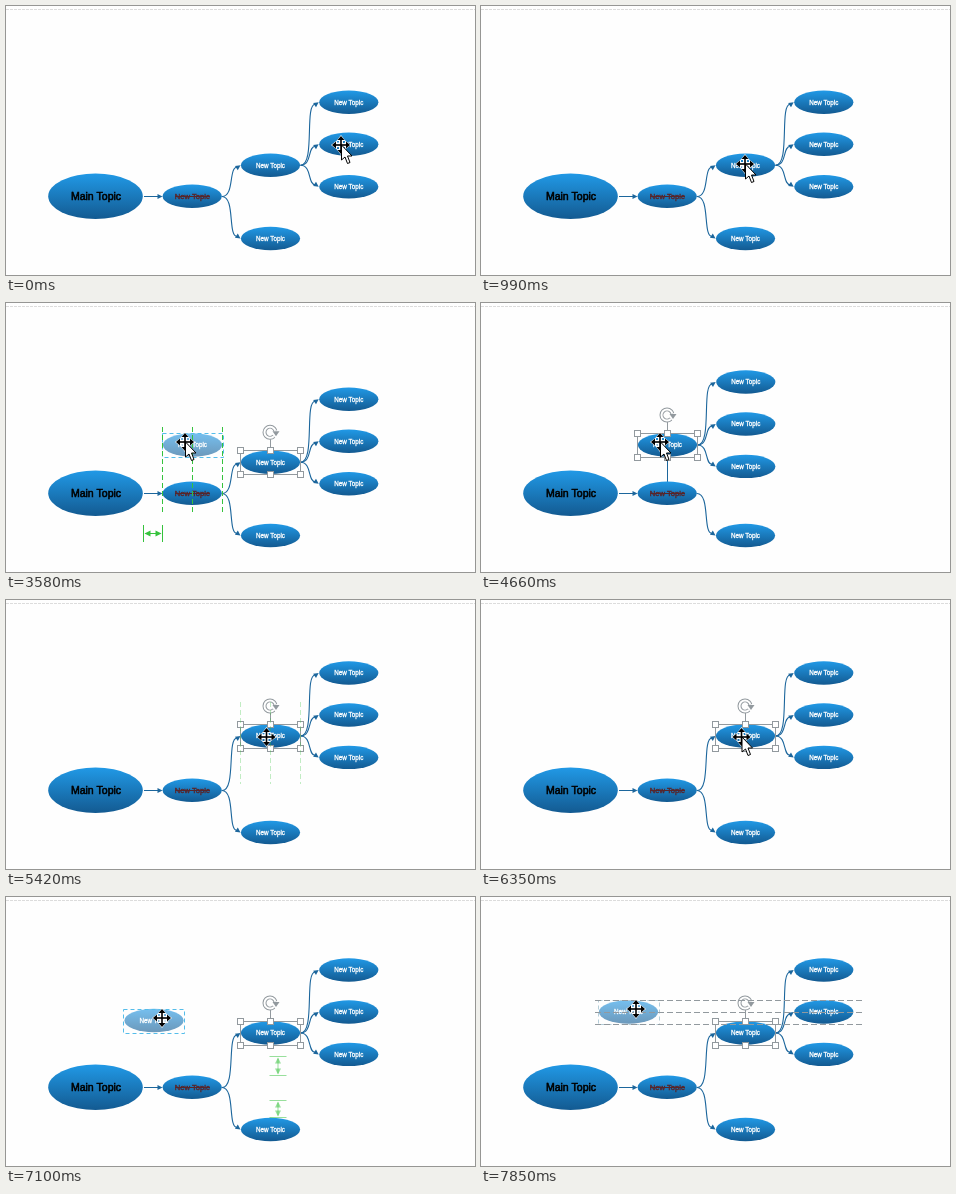
An HTML page with a canvas that plays this animation: 469x269 px, repeating every 8000 ms.

```html
<!DOCTYPE html>
<html lang="en">
<head>
<meta charset="utf-8">
<title>Mind map drag</title>
<style>
  html, body { margin: 0; width: 469px; height: 269px; overflow: hidden; background: #fefefe; }
  canvas { display: block; }
</style>
</head>
<body>
<canvas id="stage" width="469" height="269"></canvas>
<script>
const ctx = document.getElementById('stage').getContext('2d');
const LOOP = 8000;
const BLUE = '#1c669c', GREEN = '#35c23c', GRAY = '#92999e', BROWN = '#57252a';
const MAIN = { x: 89.5, y: 190.3, rx: 47.3, ry: 22.8 };
const SUB = { x: 186.2, y: 190.3 }, LOWER = { x: 264.5, y: 232.5 }, HOME = { x: 264.5, y: 159.3 };

// Cursor travel: each glide eases in the given number of steps from where the last one ended.
const START = { x: 335, y: 139 };
const glides = [
  { start: -25, end: 990, steps: 7, to: { x: 264, y: 158 }, via: { x: 383, y: 56 } },
  { start: 1300, end: 1600, steps: 2, to: { x: 254, y: 161 } },
  { start: 1910, end: 2660, steps: 5, to: { x: 179, y: 139 } },
  { start: 4660, end: 5110, steps: 3, to: { x: 260.5, y: 137 } },
  { start: 6350, end: 7100, steps: 5, to: { x: 156, y: 121 } },
  { start: 7100, end: 7550, steps: 3, to: { x: 155, y: 112 } }
];
const SELECTED = 1600;
const drags = [
  { from: 2060, snap: 2660, drop: 3730, release: 3430, dx: 10, dy: -2,
    spot: { x: 186.5, y: 142 }, columns: [124, 212] },
  { from: 4810, snap: 5110, drop: 5420, release: 5570, dx: 6, dy: 4,
    spot: { x: 264.5, y: 136 }, columns: [102, 184] },
  { from: 6500, snap: 7400, drop: LOOP, release: LOOP, dx: -8, dy: 2.5,
    spot: { x: 147.5, y: 115 }, rows: [114, 382] }
];
const within = (t, a, b) => t >= a && t < b;
const smooth = p => p * p * (3 - 2 * p);

function cursorAt(t) {
  return glides.reduce((from, { start, end, steps, to, via }) => {
    const step = Math.floor((t - start) / (end - start) * steps + 1e-6);
    const p = smooth(Math.min(1, Math.max(0, step / steps)));
    const curve = k => {
      const mid = via ? via[k] : (from[k] + to[k]) / 2;
      return (1 - p) ** 2 * from[k] + 2 * p * (1 - p) * mid + p * p * to[k];
    };
    return { x: curve('x'), y: curve('y') };
  }, START);
}

function line(x1, y1, x2, y2, color, dash = []) {
  ctx.strokeStyle = color;
  ctx.lineWidth = 1;
  ctx.setLineDash(dash);
  ctx.beginPath();
  ctx.moveTo(x1, y1);
  ctx.lineTo(x2, y2);
  ctx.stroke();
  ctx.setLineDash([]);
}

function poly(points, fill) {
  ctx.beginPath();
  points.forEach(([x, y]) => ctx.lineTo(x, y));
  ctx.closePath();
  ctx.fillStyle = fill;
  ctx.fill();
}

function label(x, y, text = 'New Topic', size = 6.3, color = '#fff', weight = 0.3) {
  ctx.font = `${size}px "Liberation Sans", Arial, sans-serif`;
  ctx.textAlign = 'center';
  ctx.textBaseline = 'middle';
  ctx.fillStyle = ctx.strokeStyle = color;
  ctx.lineWidth = weight;
  ctx.fillText(text, x, y + 0.5);
  ctx.strokeText(text, x, y + 0.5);
}

function bubble({ x, y, rx = 29.6, ry = 11.7 }) {
  const shade = ctx.createLinearGradient(0, y - ry, 0, y + ry);
  shade.addColorStop(0, '#2199e6');
  shade.addColorStop(1, '#135a91');
  ctx.fillStyle = shade;
  ctx.beginPath();
  ctx.ellipse(x, y, rx, ry, 0, 0, 7);
  ctx.fill();
}

function head(x, y, angle, color, size = 5) {
  ctx.save();
  ctx.translate(x, y);
  ctx.rotate(angle);
  poly([[0, 0], [-size, -size / 2], [-size, size / 2]], color);
  ctx.restore();
}

// The taller the link, the more upright its middle.
function connect(x1, y1, x2, y2) {
  const way = Math.sign(y2 - y1), bend = 10 + Math.abs(y2 - y1) * 0.08;
  ctx.strokeStyle = BLUE;
  ctx.lineWidth = 1.1;
  ctx.beginPath();
  ctx.moveTo(x1, y1);
  ctx.bezierCurveTo(x1 + bend, y1, x2 - bend, y2 - way * 2, x2 - 4, y2 - way * 2);
  ctx.stroke();
  head(x2 - 0.5, y2, way * 0.6, BLUE);
}

function gap(a, b, mid, vertical) {
  ctx.save();
  if (vertical) ctx.transform(0, 1, 1, 0, 0, 0);
  for (const x of [a, b]) line(x, mid - 8.5, x, mid + 8.5, GREEN);
  line(a + 2, mid, b - 2, mid, GREEN);
  head(a + 1, mid, Math.PI, GREEN, 6);
  head(b - 1, mid, 0, GREEN, 6);
  ctx.restore();
}

function selection({ x, y }) {
  const top = Math.round(y - 12) + 0.5;
  line(x, y - 23, x, top, GRAY);
  ctx.strokeRect(x - 30, top, 60, 24);
  for (const dx of [-30, 0, 30]) for (const dy of [0, 24]) {
    ctx.fillStyle = '#fff';
    ctx.fillRect(x + dx - 3, top + dy - 3, 6, 6);
    ctx.strokeRect(x + dx - 3, top + dy - 3, 6, 6);
  }
  for (const [width, color] of [[4, GRAY], [2, '#fff']]) {
    ctx.lineWidth = width;
    ctx.strokeStyle = color;
    ctx.beginPath();
    ctx.arc(x - 0.5, y - 30, 5.5, 0.8, 6);
    ctx.stroke();
  }
  poly([[x + 2, y - 31], [x + 9, y - 31], [x + 5.5, y - 26]], GRAY);
}

function ghost({ x, y }, boxColor) {
  ctx.globalAlpha = 0.62;
  bubble({ x, y });
  ctx.globalAlpha = 1;
  label(x, y);
  ctx.strokeStyle = boxColor;
  ctx.lineWidth = 1;
  ctx.setLineDash([4, 3]);
  ctx.strokeRect(Math.round(x - 30) - 0.5, Math.round(y - 12) + 0.5, 61, 24);
  ctx.setLineDash([]);
}

function moveCross(x, y) {
  for (const [half, color, grow] of [[2, '#fff', 1], [0.8, '#000', 0]]) {
    for (let i = 0; i < 4; i++) {
      ctx.save();
      ctx.translate(x, y);
      ctx.rotate(i * Math.PI / 2);
      ctx.fillStyle = color;
      ctx.fillRect(0, -half, 7, half * 2);
      poly([[9 + grow, 0], [5 - grow, -3.5 - grow], [5 - grow, 3.5 + grow]], color);
      ctx.restore();
    }
  }
}

function pointer(x, y) {
  poly([[0, 0], [0, 15], [3.5, 12], [6, 18.5], [8.5, 17.5], [6, 11], [10.5, 11]]
    .map(([dx, dy]) => [x + dx, y + dy]), '#fff');
  ctx.strokeStyle = '#000';
  ctx.lineWidth = 1;
  ctx.stroke();
}

// Spacing marks fade out in steps of 150 ms.
function spacing(t, start, end, peak, columns) {
  if (!within(t, start, end)) return;
  const age = Math.floor((t - start) / 150) * 150;
  ctx.globalAlpha = peak * (1 - age / (end - start));
  if (columns) for (const x of [137.5, 216.5, 294.5]) gap(x, x + 19, 224.5);
  gap(159.5, 178.5, 272, true);
  gap(203.5, 220.5, 272, true);
  ctx.globalAlpha = 1;
}

function alignment(t, { snap, drop, spot, columns, rows }) {
  if (!within(t, snap, drop + 150)) return;
  ctx.globalAlpha = t < drop ? 1 : 0.3;
  if (columns) for (const dx of [-30, 0, 30]) line(spot.x + dx, columns[0], spot.x + dx, columns[1], GREEN, [5, 3]);
  if (rows) for (const dy of [-12, 0, 12]) line(rows[0], spot.y + dy + 0.5, rows[1], spot.y + dy + 0.5, GRAY, [6, 3]);
  if (spot.x === 186.5) gap(137.5, 156.5, 230.5);
  ctx.globalAlpha = 1;
}

function draw(t) {
  ctx.fillStyle = '#fefefe';
  ctx.fillRect(0, 0, 469, 269);
  line(0, 3.5, 469, 3.5, '#dcdcdc', [3, 1]);

  const cursor = cursorAt(t);
  const node = drags.reduce((spot, d) => t >= d.drop ? d.spot : spot, HOME);
  const children = [-63, -21, 21.4].map(dy => ({ x: node.x + 78.3, y: node.y + dy }));
  const drag = drags.find(d => within(t, d.from, d.drop));
  const carried = drag && (t >= drag.snap ? drag.spot : { x: cursor.x + drag.dx, y: cursor.y + drag.dy });

  line(138, 190.5, 152, 190.5, BLUE);
  head(156.5, 190.5, 0, BLUE);
  if (node.x < 200) line(SUB.x + 0.3, 179, SUB.x + 0.3, 154, BLUE);
  else connect(216, 190.5, 235, node.y);
  connect(216, 190.5, 235, LOWER.y);
  for (const { x, y } of children) connect(node.x + 30, node.y, x - 29.6, y);

  bubble(MAIN);
  label(MAIN.x + 0.5, MAIN.y + 0.6, 'Main Topic', 10.5, '#000', 0.55);
  bubble(SUB);
  label(SUB.x, SUB.y, 'New Topic', 7.6, BROWN, 0.4);
  line(169, 190.5, 204, 190.5, BROWN);
  for (const spot of [LOWER, node, ...children]) {
    bubble(spot);
    label(spot.x, spot.y);
  }

  if (t >= SELECTED) selection(node);
  if (carried) ghost(carried, drag.rows && t >= drag.snap ? '#b5cdd8' : '#55bdea');
  spacing(t, 2060, 2360, 0.3, true);
  spacing(t, 6800, 7400, 1, false);
  for (const d of drags) alignment(t, d);

  const shapes = [MAIN, SUB, LOWER, node, ...children].concat(carried || []);
  const hover = shapes.some(({ x, y, rx = 30, ry = 12 }) =>
    Math.hypot((cursor.x - x) / rx, (cursor.y - y) / ry) < 1);
  const dragging = drags.some(d => within(t, d.from, d.release));
  if (hover || dragging) moveCross(cursor.x, cursor.y);
  if (!dragging) pointer(cursor.x + 0.5, cursor.y);
}

function tick() {
  draw(performance.now() % LOOP);
  requestAnimationFrame(tick);
}
tick();
</script>
</body>
</html>
```
